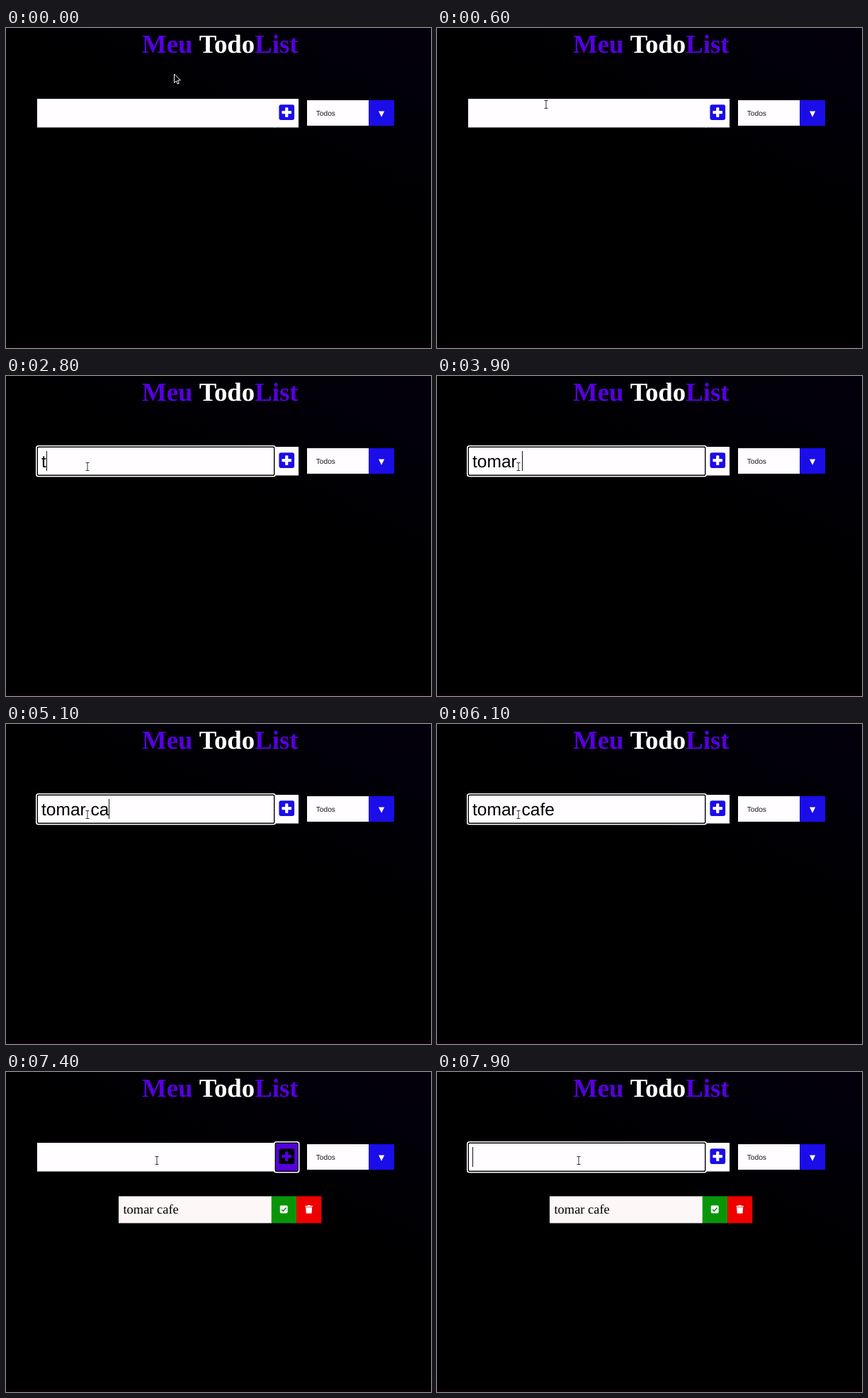
These frames come from a looping animation (600x452 px, 8 s). An HTML page with a canvas:

```html
<!DOCTYPE html>
<html lang="pt">
<head>
<meta charset="utf-8">
<title>Meu TodoList</title>
<style>
html, body { margin: 0; width: 100%; height: 100%; overflow: hidden; background: #000; }
canvas { display: block; }
</style>
</head>
<body>
<canvas id="stage" width="600" height="452"></canvas>
<script>
const ctx = document.getElementById('stage').getContext('2d');
const LOOP = 8000, STEP = 100, BLINK = 600;
const ZOOM = .767; // the page is shown smaller than its CSS sizes
const SANS = '"Liberation Sans", Arial, sans-serif';
const SERIF = '"Liberation Serif", "Times New Roman", serif';
const BLUE = [27, 13, 232], PURPLE = [86, 0, 222], WHITE = [255, 253, 255], BLACK = [0, 0, 0];
const PAPER = '#fffdff';
const TASK = 'tomar cafe';
const FOCUS = 700, ADDED = 7200, REFOCUS = 7700;

const START = { x: 237, y: 65 };
const MOVES = [
  { from: 100, to: 900, x: 115, y: 128 },
  { from: 6200, to: 6450, x: 252, y: 138 },
  { from: 6550, to: 6900, x: 402, y: 119 },
  { from: 7200, to: 7400, x: 213, y: 125 },
  { from: 7400, to: 7900, x: 200, y: 125 }
];
const BURSTS = [
  { at: 2700, pace: 175, letters: 5 },
  { at: 3900, pace: 700, letters: 2 },
  { at: 5100, pace: 200, letters: 3 }
];
const KEYS = BURSTS.flatMap(b => Array.from({ length: b.letters }, (_, i) => b.at + i * b.pace));

const ramp = (t, from, to) => Math.min(1, Math.max(0, (t - from) / (to - from)));
const ease = k => k * k * (3 - 2 * k);
const mix = (a, b, k) => `rgb(${a.map((v, i) => Math.round(v + (b[i] - v) * k))})`;
const rgb = color => mix(color, color, 0);

function rect(x, y, w, h, color, r = 0) {
  ctx.fillStyle = color;
  ctx.beginPath();
  ctx.roundRect(x, y, w, h, r);
  ctx.fill();
}

// Takes the CSS font size and returns where the text ends on the stage.
function text(str, x, y, size, family, color, weight = 'normal') {
  ctx.save();
  ctx.translate(x, y);
  ctx.scale(ZOOM, ZOOM);
  ctx.font = `${weight} ${size}px ${family}`;
  ctx.textRendering = 'geometricPrecision';
  ctx.fillStyle = color;
  ctx.fillText(str, 0, 0);
  const width = ctx.measureText(str).width * ZOOM;
  ctx.restore();
  return x + width;
}

function poly(points, fill, stroke, width = 1) {
  ctx.beginPath();
  points.forEach(([x, y]) => ctx.lineTo(x, y));
  if (fill) { ctx.closePath(); ctx.fillStyle = fill; ctx.fill(); }
  if (stroke) { ctx.strokeStyle = stroke; ctx.lineWidth = width; ctx.stroke(); }
}

function background() {
  const glow = ctx.createLinearGradient(480, 251, 600, 0);
  glow.addColorStop(0, '#000');
  glow.addColorStop(1, '#03000c');
  rect(0, 0, 600, 452, glow);
  rect(0, 448, 600, 4, '#0b0006');
}

function title() {
  const word = (str, x, color) => text(str, x, 34.5, 48, SERIF, color, 'bold');
  let x = word('Meu ', 192, rgb(PURPLE));
  x = word('Todo', x, '#fff');
  word('List', x, rgb(PURPLE));
}

function focusRing(x, y, w, h, fill) {
  rect(x - 2, y - 2, w + 4, h + 4, '#fff', 3.5);
  rect(x - .4, y - .4, w + .8, h + .8, '#000', 2.2);
  rect(x + 1, y + 1, w - 2, h - 2, fill, 1.2);
}

function addButton(t) {
  const hover = ramp(t, 6830, 7220) - ramp(t, 7400, 7700);
  const back = mix(WHITE, PURPLE, hover);
  rect(379, 100, 34, 40.5, back);
  if (t >= ADDED && t < REFOCUS) focusRing(380, 100, 32.5, 40.5, back);
  rect(385.4, 108.2, 21.7, 21.7, mix(BLUE, BLACK, hover), 3);
  rect(389.4, 117, 13.6, 4.2, back, 1);
  rect(394.1, 112.3, 4.2, 13.6, back, 1);
}

function select() {
  rect(425, 102, 87, 36, PAPER);
  rect(512, 102, 36, 36, rgb(BLUE));
  text('Todos', 437.7, 124, 13.333, SANS, '#1a1a1a');
  poly([[526, 117.5], [534.2, 117.5], [530.1, 125.7]], '#fff');
}

function form(t) {
  rect(44, 100, 336, 40.5, PAPER);
  addButton(t);
  const focused = t >= FOCUS && t < ADDED || t >= REFOCUS;
  if (focused) focusRing(44, 100, 335, 40.5, PAPER);

  const typed = t < ADDED ? TASK.slice(0, KEYS.filter(k => k <= t).length) : '';
  const end = text(typed, 50, 128.5, 32, SANS, '#000');
  const touched = Math.max(...[FOCUS, ...KEYS, REFOCUS].filter(k => k <= t));
  if (focused && (t - touched) % (2 * BLINK) < BLINK) rect(Math.round(end), 106, 1, 28, '#111');
}

function taskRow() {
  rect(159, 175.5, 216, 38, '#fdf7f7');
  text(TASK, 165.5, 200, 24, SERIF, '#000');
  rect(374.7, 175.5, 35.3, 38, '#089608');
  rect(410, 175.5, 35.3, 38, '#ee0000');
  rect(386.8, 188.6, 10.8, 10.8, '#fff', 1.6);
  poly([[389, 194.2], [391.3, 196.4], [395.5, 191.8]], null, '#089608', 1.5);
  rect(422.4, 189, 10.4, 1.5, '#fff', .5);
  rect(425.5, 188, 4.2, 1.5, '#fff', .7);
  poly([[423.1, 191.3], [432.1, 191.3], [431.5, 199.8], [423.7, 199.8]], '#fff');
}

function arrow() {
  poly([[0, 0], [0, 12.3], [2.9, 9.7], [4.9, 14], [6.8, 13.1], [4.9, 9], [8.8, 8.8]], '#000', '#fff');
}

function iBeam() {
  const dark = '#333';
  poly([[0, -5.5], [0, 5.5]], null, dark);
  for (const y of [-5.5, 5.5]) poly([[-2.5, y], [2.5, y]], null, dark);
}

function hand() {
  poly([[-1, -1], [.8, -1], [1.4, 3.5], [6.5, 4.6], [7.5, 6], [6.7, 10], [5.8, 12.5],
    [0, 12.5], [-4.2, 7], [-3.4, 5.8], [-1, 7.3]], '#fff', '#000', .9);
}

function pointer(t) {
  let { x, y } = START;
  for (const move of MOVES) {
    const k = ease(ramp(t, move.from, move.to));
    x += (move.x - x) * k;
    y += (move.y - y) * k;
  }
  const inForm = y >= 100 && y <= 140.5 && x >= 44 && x < 413;
  const shape = !inForm ? arrow : x < 379 ? iBeam : hand;
  ctx.save();
  ctx.translate(Math.round(x) + (shape === iBeam ? 0 : .5), Math.round(y));
  shape();
  ctx.restore();
}

function draw(now) {
  const t = Math.floor(now % LOOP / STEP) * STEP;
  background();
  title();
  form(t);
  select();
  if (t >= ADDED) taskRow();
  pointer(t);
  requestAnimationFrame(() => draw(performance.now()));
}
draw(0);
</script>
</body>
</html>
```
